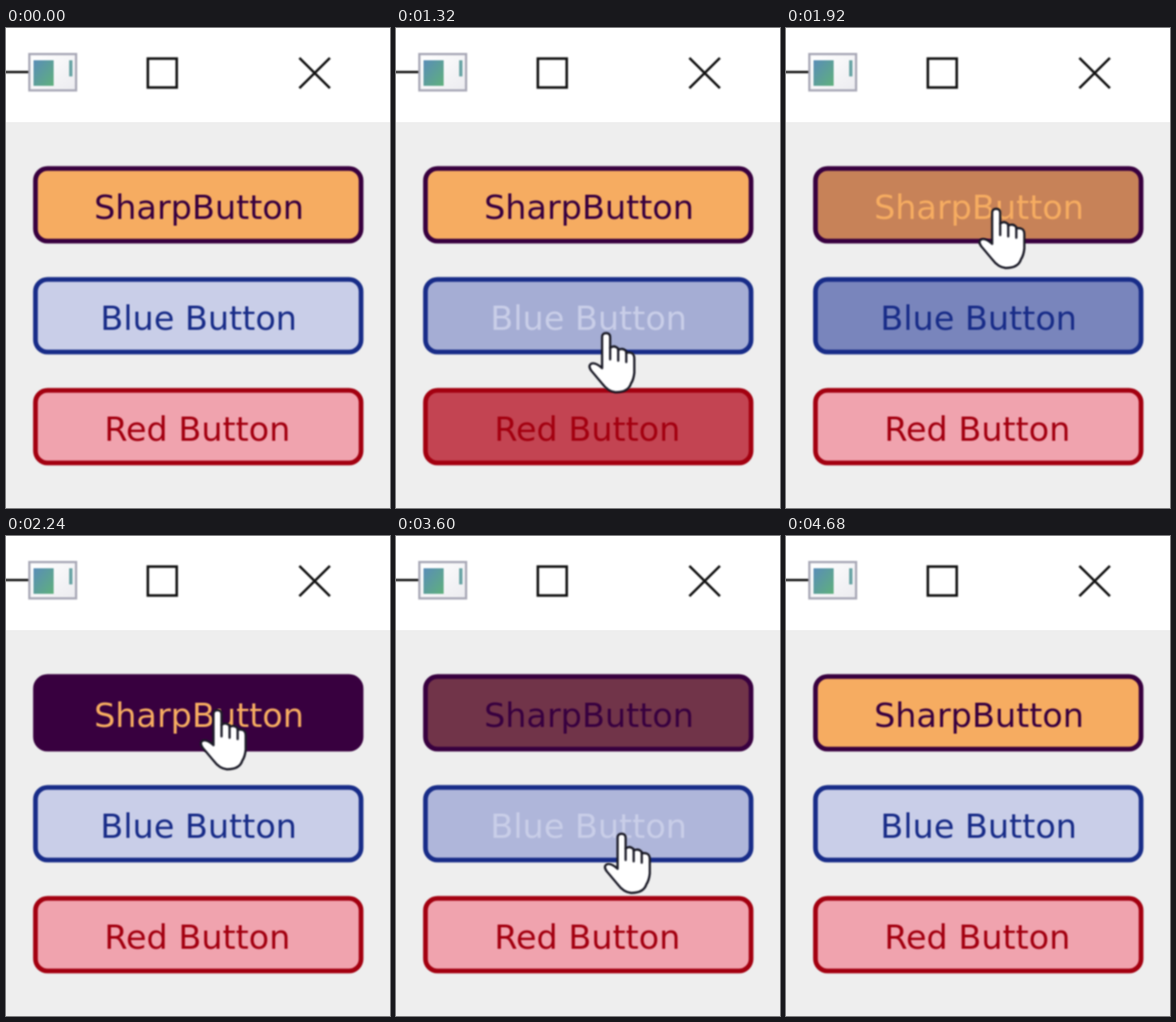
These frames come from a looping animation (572 by 714 pixels, 4.72 s). An HTML page:

```html
<!DOCTYPE html>
<html lang="en">
<head>
<meta charset="utf-8">
<title>Fading buttons</title>
<style>
  html, body { margin: 0; width: 100%; height: 100%; overflow: hidden; background: #eee; }
  svg { display: block; width: 100%; height: 100%; }
  text { font: 49.8px "DejaVu Sans", sans-serif; fill: var(--dark); text-anchor: middle; }
  .soft { filter: blur(.8px); }
  .face { fill: var(--light); }
  .fade { fill: var(--dark); opacity: 0; }
  .edge { fill: none; stroke: var(--dark); stroke-width: 7; }

  .orange { --light: #f6ac61; --dark: #38003f; }
  .blue { --light: #c9cee8; --dark: #182c88; }
  .red { --light: #f0a3ae; --dark: #a30010; }

  .fade, text, #cursor, #hand, #arrow { animation: 4.72s linear infinite; }
  text, #hand, #arrow { animation-timing-function: step-end; }
  .orange .fade { animation-name: orange-fade; }
  .blue .fade { animation-name: blue-fade; }
  .red .fade { animation-name: red-fade; }
  .orange text { animation-name: orange-text; }
  .blue text { animation-name: blue-text; }
  .red text { animation-name: red-text; }
  #cursor { animation-name: move; }
  #hand { animation-name: over; }
  #arrow { animation-name: outside; }

  /* Fills take 400 ms each way; labels switch at once. */
  @keyframes orange-fade {
    0%, 38.64%, 82.2%, 100% { opacity: 0; }
    47.12%, 73.73% { opacity: 1; }
  }
  @keyframes blue-fade {
    0%, 26.27%, 44.49%, 75.08%, 79.58%, 100% { opacity: 0; }
    34.75%, 36.02% { opacity: 1; }
    77.33% { opacity: .265; }
  }
  @keyframes red-fade {
    0%, 13.73%, 32.88%, 78.6%, 84.53%, 100% { opacity: 0; }
    22.2%, 24.41% { opacity: 1; }
    81.57% { opacity: .35; }
  }
  @keyframes orange-text {
    0%, 73.73%, 100% { fill: var(--dark); }
    38.64% { fill: var(--light); }
  }
  @keyframes blue-text {
    0%, 36.02%, 77.33%, 100% { fill: var(--dark); }
    26.27%, 75.08% { fill: var(--light); }
  }
  @keyframes red-text {
    0%, 24.41%, 81.57%, 100% { fill: var(--dark); }
    13.73%, 78.6% { fill: var(--light); }
  }
  @keyframes over {
    0%, 24.41%, 36.02%, 73.73%, 77.33%, 81.57%, 100% { opacity: 0; }
    13.73%, 26.27%, 38.64%, 75.08%, 78.6% { opacity: 1; }
  }
  @keyframes outside {
    0%, 24.41%, 36.02%, 73.73%, 77.33%, 81.57%, 100% { opacity: 1; }
    13.73%, 26.27%, 38.64%, 75.08%, 78.6% { opacity: 0; }
  }
  @keyframes move {
    0%, 7.42% { transform: translate(345px, 722px); }
    13.73% { transform: translate(339px, 651px); }
    18.64% { transform: translate(333px, 562px); }
    24.41% { transform: translate(323px, 537px); }
    26.27% { transform: translate(317px, 486px); }
    27.97% { transform: translate(313px, 455px); }
    36.02% { transform: translate(311px, 371px); }
    38.64% { transform: translate(312px, 321px); }
    40.68% { transform: translate(313px, 270px); }
    47.46% { transform: translate(315px, 260px); }
    63.56% { transform: translate(322px, 262px); }
    69.92% { transform: translate(328px, 285px); }
    73.73% { transform: translate(332px, 321px); }
    75.08% { transform: translate(334px, 371px); }
    76.27% { transform: translate(336px, 443px); }
    77.33% { transform: translate(337px, 486px); }
    78.6% { transform: translate(338px, 537px); }
    81.57% { transform: translate(340px, 651px); }
    84.75%, 100% { transform: translate(342px, 722px); }
  }
</style>
</head>
<body>
<svg viewBox="0 0 572 714">
  <defs>
    <linearGradient id="pane" x2="1" y2="1">
      <stop stop-color="#5a8db8"/>
      <stop offset="1" stop-color="#5fb07c"/>
    </linearGradient>
    <linearGradient id="paper" x2="1" y2="1">
      <stop stop-color="#fff"/>
      <stop offset="1" stop-color="#ececf0"/>
    </linearGradient>
    <rect id="box" x="43.9" y="3" width="485" height="108" rx="18"/>
  </defs>

  <rect width="572" height="714" fill="#eee"/>
  <rect width="572" height="140" fill="#fff"/>

  <g class="soft">
    <path d="M-8 65.5H34" stroke="#111" stroke-width="3.6"/>
    <rect x="34.8" y="38.8" width="69.6" height="54" fill="url(#paper)" stroke="#a9a9b7" stroke-width="3.4"/>
    <rect x="41" y="48" width="30" height="38" fill="url(#pane)"/>
    <rect x="94" y="48" width="5" height="24" fill="#6aa5a5"/>
    <rect x="211.3" y="45.5" width="43" height="43" fill="none" stroke="#111" stroke-width="3.8"/>
    <path d="M437 44.5L482.5 89.5M482.5 44.5L437 89.5" stroke="#111" stroke-width="3.8"/>
  </g>

  <g class="soft">
    <g class="orange" transform="translate(0 206)">
      <use href="#box" class="face"/><use href="#box" class="fade"/><use href="#box" class="edge"/>
      <text x="287.5" y="77.5">SharpButton</text>
    </g>
    <g class="blue" transform="translate(0 371)">
      <use href="#box" class="face"/><use href="#box" class="fade"/><use href="#box" class="edge"/>
      <text x="287" y="77.5">Blue Button</text>
    </g>
    <g class="red" transform="translate(0 536)">
      <use href="#box" class="face"/><use href="#box" class="fade"/><use href="#box" class="edge"/>
      <text x="285" y="77.5">Red Button</text>
    </g>
  </g>

  <g class="soft">
    <g id="cursor" fill="#fff" stroke="#1c1c28" stroke-width="3.4" stroke-linejoin="round" stroke-linecap="round">
      <path id="arrow" d="M0 0V66L15 52L25 75L35 71L25 48H46Z"/>
      <g id="hand">
        <path d="M-6 5Q-6-1 0-1T6 5V21Q12 16 18 22V24Q25 20 30 26V28Q42 26 42 37V58Q41 68 37 74Q33 87 14 87Q3 86-6 74L-22 55Q-27 48-23 45Q-17 41-6 51Z"/>
        <path d="M6 21V38M18 23V40M30 27V42" fill="none"/>
      </g>
    </g>
  </g>
</svg>
</body>
</html>
```
